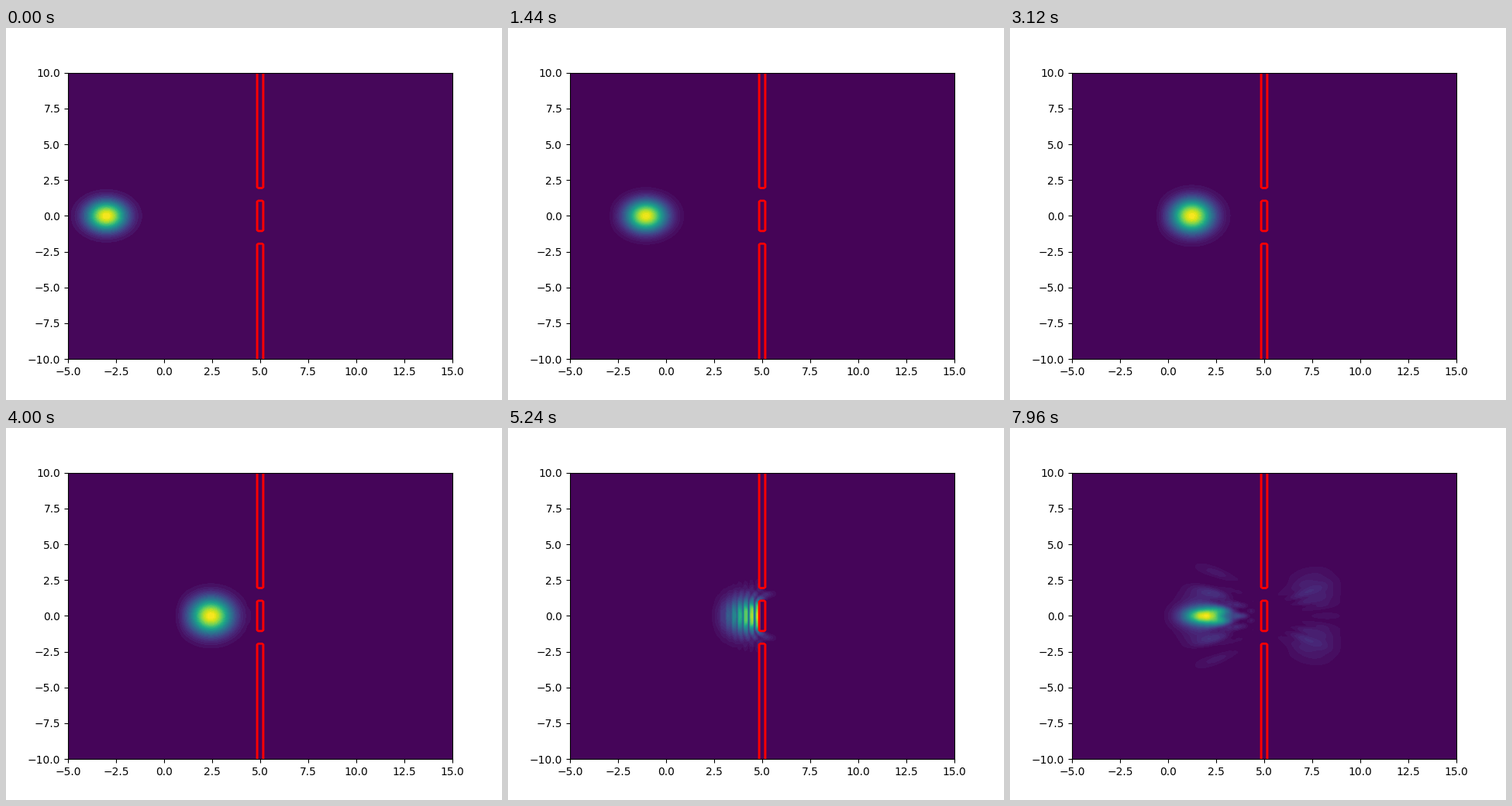
Animation of 640 by 480 pixels, one loop 8 s. Source, as a matplotlib script:

```python
import numpy as np
import matplotlib.pyplot as plt
from matplotlib.animation import FuncAnimation

FRAMES = 200
INTERVAL = 40
N = 201
DT = 0.00665        # simulated time per frame
K0 = 10.0           # wave number of the packet
START = -3.0
PEAK = 4.35         # density at the packet's centre at the start
WALL_HEIGHT = 300.0
LEVELS = 42

x = np.linspace(-5, 15, N)
y = np.linspace(-10, 10, N)
X, Y = np.meshgrid(x, y)
dx = x[1] - x[0]

# A thin wall at x = 5 with two slits between |y| = 1 and |y| = 2
in_slit = (np.abs(Y) > 1.05) & (np.abs(Y) < 1.95)
wall = ((np.abs(X - 5) < 0.15) & ~in_slit).astype(float)


def neighbours(p):
    s = np.zeros_like(p)
    s[1:] += p[:-1]
    s[:-1] += p[1:]
    s[:, 1:] += p[:, :-1]
    s[:, :-1] += p[:, 1:]
    return s


def simulate():
    """Crank-Nicolson steps of the Schroedinger equation, solved by iteration."""
    psi = np.exp(-((X - START) ** 2 + Y ** 2) / 2 + 1j * K0 * X)
    psi = (np.sqrt(PEAK) * psi).astype(np.complex64)
    hop = 0.25j * DT / dx ** 2
    diag = (1 + 0.5j * DT * (2 / dx ** 2 + WALL_HEIGHT * wall)).astype(np.complex64)
    inv = 1 / diag
    hop_inv = (hop * inv).astype(np.complex64)
    back = 2 - diag
    densities = []
    for _ in range(FRAMES):
        densities.append(np.abs(psi) ** 2)
        base = inv * back * psi + hop_inv * neighbours(psi)
        for _ in range(18):
            psi = base + hop_inv * neighbours(psi)
    return densities


density = simulate()

fig, ax = plt.subplots(figsize=(6.4, 4.8), dpi=100)
ax.contour(X, Y, wall, levels=[0.25, 0.6], colors="red", linewidths=1.5)
ax.set_xlim(-5, 15)
ax.set_ylim(-10, 10)

# Only the middle rows hold visible bands; the rest is the lowest colour
rows = slice(45, 156)
bands = []


def draw(i):
    while bands:
        bands.pop().remove()
    filled = ax.contourf(X[rows], Y[rows], density[i][rows], LEVELS, cmap="viridis")
    bands.append(filled)
    ax.set_facecolor(filled.get_facecolor()[0])
    ax.set_xlim(-5, 15)
    ax.set_ylim(-10, 10)
    return bands


anim = FuncAnimation(fig, draw, frames=FRAMES, interval=INTERVAL,
                     repeat=True, repeat_delay=0, blit=False)
plt.show()
```
